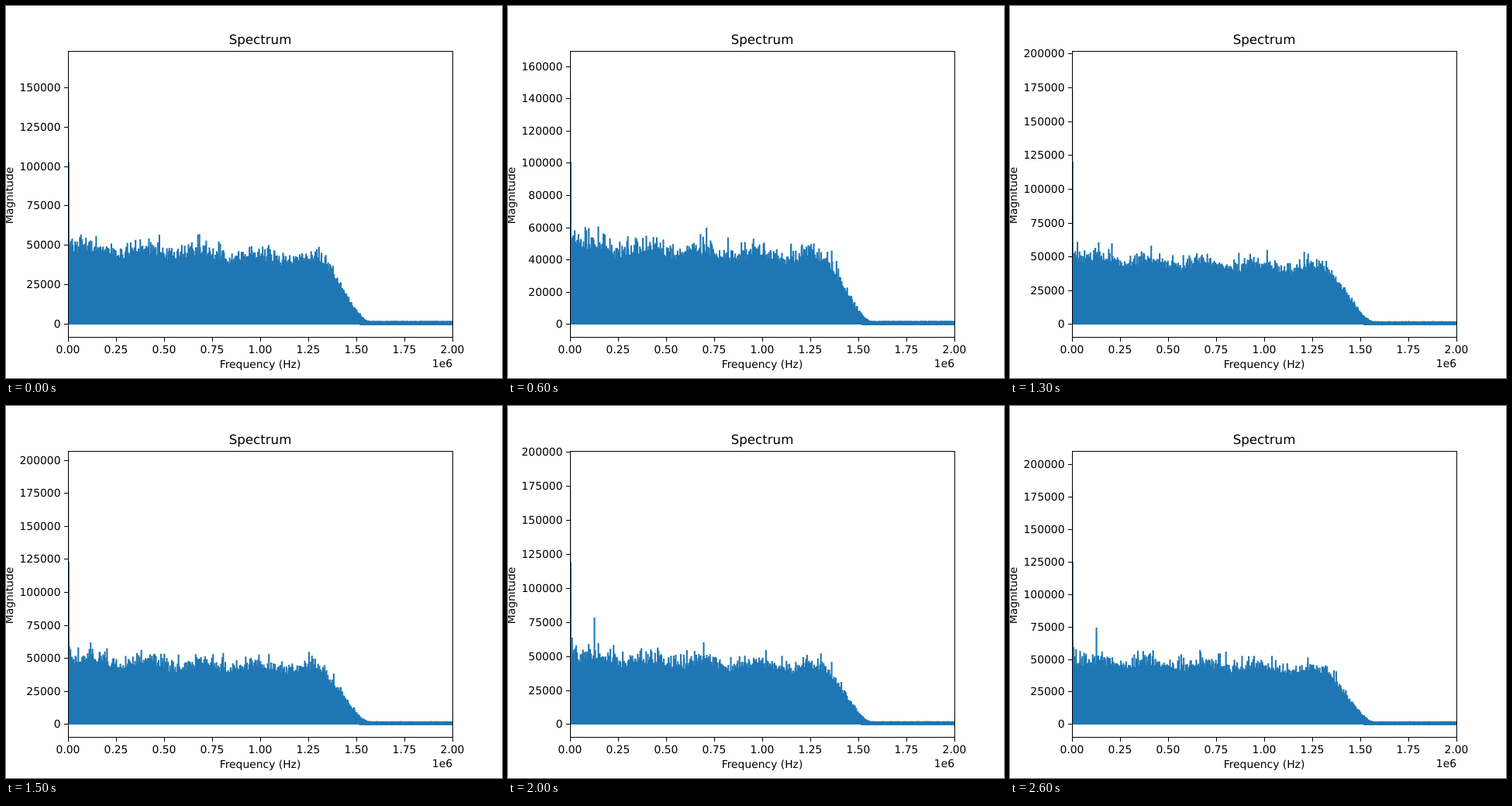
These frames come from a looping animation (640x480 px, 2700 ms). An HTML page with a canvas:

```html
<!DOCTYPE html>
<html lang="en">
<head>
<meta charset="utf-8">
<title>Spectrum</title>
<style>
  html, body { margin: 0; width: 100%; height: 100%; overflow: hidden; background: #fff; }
  canvas { display: block; }
</style>
</head>
<body>
<canvas id="plot" width="640" height="480"></canvas>
<script>
const ctx = document.getElementById('plot').getContext('2d');
const STEP_MS = 100, SWEEPS = 27;
const LEFT = 80, RIGHT = 576, TOP = 58, BOTTOM = 427;
const ZERO_Y = 410.4, DATA_HEIGHT = 336;
const BLUE = '#1f77b4';
const TONE_X = 111, TONE_START = 16;

// Key points [sweep, highest magnitude in thousands].
const maxKeys = [
  [0, 164.8], [3, 167.3], [6, 161.5], [8, 197.4], [10, 182.7],
  [13, 192.6], [18, 204.1], [23, 172.6], [25, 197.4], [26, 200.4]
];

function maximumAt(sweep) {
  const next = Math.max(1, maxKeys.findIndex(([at]) => at >= sweep));
  const [startAt, start] = maxKeys[next - 1];
  const [endAt, end] = maxKeys[next];
  return start + (end - start) * (sweep - startAt) / (endAt - startAt);
}

function makeRandom(seed) {
  let state = seed * 7919 + 17;
  return () => {
    state = (state + 0x6D2B79F5) | 0;
    let t = Math.imul(state ^ (state >>> 15), 1 | state);
    t = (t + Math.imul(t ^ (t >>> 7), 61 | t)) ^ t;
    return ((t ^ (t >>> 14)) >>> 0) / 4294967296;
  };
}

// Passband level with gentle ripple and a cosine roll-off.
function envelope(x) {
  const ripple = 2.2 * Math.cos((x - 182) / 70 * 2 * Math.PI);
  const level = 46 - 7 * (x - LEFT) / 310 + ripple + 12 * Math.exp((LEFT - x) / 4);
  const t = Math.min(1, Math.max(0, (x - 402) / 68));
  return level * (1 + Math.cos(Math.PI * t)) / 2;
}

function stem(x, width, magnitude, scale, bottom = 411) {
  const top = ZERO_Y - magnitude * scale - 0.8;
  ctx.fillRect(x, top, width, bottom - top);
}

function drawSpectrum(sweep, max, scale) {
  const random = makeRandom(sweep + 1);
  ctx.save();
  ctx.beginPath();
  ctx.rect(LEFT, TOP, RIGHT - LEFT, BOTTOM - TOP);
  ctx.clip();
  ctx.fillStyle = BLUE;
  for (let x = LEFT; x < RIGHT; x++) {
    const level = envelope(x);
    const noise = -Math.log(-Math.log(0.02 + 0.976 * random()));
    const burst = 2.8 * noise * level / 45;
    const floor = 1.4 + 0.3 * random();
    stem(x + random() - 1, 2.1, floor + level + burst, scale, level < 4 ? 411.8 : 411);
  }
  if (sweep >= TONE_START) stem(TONE_X - 0.5, 2.1, 70 + 8 * random(), scale);

  // The strong component at zero frequency falls off within a pixel.
  stem(LEFT + 1, 1, max * 0.62, scale);
  ctx.globalAlpha = 0.3;
  stem(LEFT + 1, 1, max * 0.9, scale);
  ctx.restore();
}

function label(text, x, y, align = 'center', size = 13.889) {
  ctx.font = `${size}px "DejaVu Sans", sans-serif`;
  ctx.textRendering = 'geometricPrecision';
  ctx.textAlign = align;
  ctx.fillText(text, x, y);
}

function drawAxes(max, scale) {
  ctx.fillStyle = '#000';
  for (const y of [TOP, BOTTOM]) ctx.fillRect(LEFT, y, RIGHT - LEFT + 1, 1);
  for (const x of [LEFT, RIGHT]) ctx.fillRect(x, TOP, 1, BOTTOM - TOP + 1);

  for (let i = 0; i <= 8; i++) {
    const x = LEFT + i * 62;
    ctx.fillRect(x, BOTTOM + 1, 1, 5);
    label((i / 4).toFixed(2), x, 448);
  }
  const step = [20, 25, 50].find(size => size >= max * 1.1 / 9);
  for (let value = 0; value <= max * 1.05; value += step) {
    const y = Math.round(ZERO_Y - value * scale);
    ctx.fillRect(LEFT - 5, y, 5, 1);
    label(String(value * 1000), 70.5, y + 5, 'right');
  }

  label('Spectrum', 328, 49, 'center', 16.667);
  label('Frequency (Hz)', 328, 467);
  label('1e6', 576, 466, 'right');
  ctx.save();
  ctx.translate(9, 244.5);
  ctx.rotate(-Math.PI / 2);
  label('Magnitude', 0, 0);
  ctx.restore();
}

function render() {
  const sweep = Math.floor(performance.now() / STEP_MS) % SWEEPS;
  const max = maximumAt(sweep);
  const scale = DATA_HEIGHT / max;
  ctx.fillStyle = '#fff';
  ctx.fillRect(0, 0, 640, 480);
  drawSpectrum(sweep, max, scale);
  drawAxes(max, scale);
  requestAnimationFrame(render);
}
render();
</script>
</body>
</html>
```
